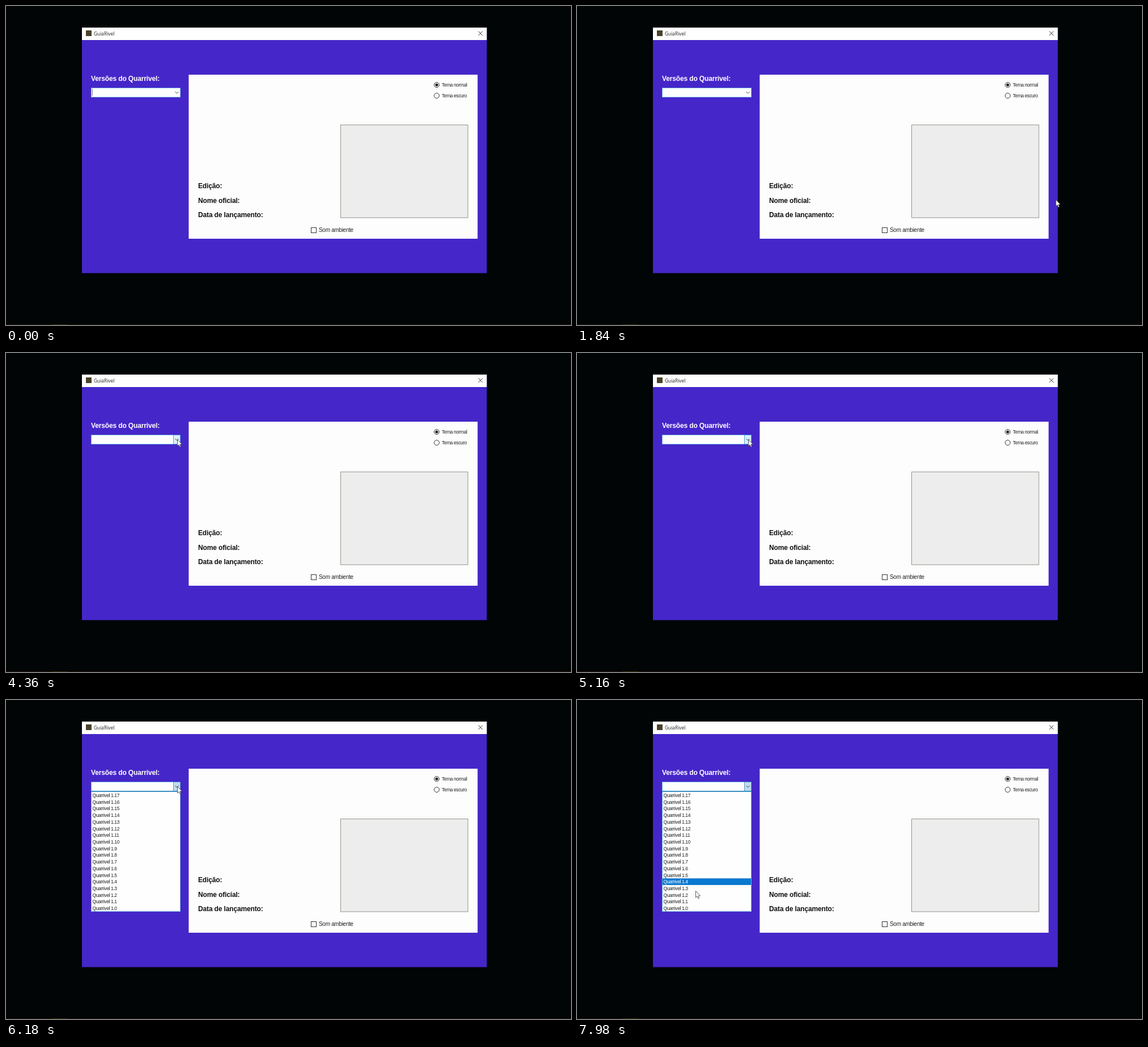
Recreate the animation shown at these times as an HTML page with a canvas. Size 997 by 562 pixels, loop 8000 ms.

```html
<!DOCTYPE html>
<html lang="pt">
<head>
<meta charset="utf-8">
<title>GuiaRivel</title>
<style>
  html, body { margin: 0; width: 100%; height: 100%; overflow: hidden; background: #010505; }
  canvas { display: block; width: 997px; height: 562px; }
</style>
</head>
<body>
<canvas id="stage"></canvas>
<script>
const W = 997, H = 562, LOOP = 8000;
const SANS = '"Liberation Sans", Arial, sans-serif';
const TITLE_FONT = '"Open Sans", "Noto Sans", sans-serif';
const LIST = { x: 150, y: 161, w: 158, h: 212, row: 11.71 };
const ITEMS = Array.from({ length: 18 }, (_, i) => `Quarrivel 1.${17 - i}`);
const ENTRY = { x: 1010, y: 392 };
const REST = { x: 308, y: 175 };
const BUTTON = { x: 302, y: 152 };
const PICK = { x: 209, y: 336 };

const canvas = document.getElementById('stage');
const ctx = canvas.getContext('2d');
const dpr = window.devicePixelRatio || 1;
canvas.width = W * dpr;
canvas.height = H * dpr;

const progress = (t, from, to) => Math.min(1, Math.max(0, (t - from) / (to - from)));
const smooth = u => u * u * (3 - 2 * u);
const easeOut = u => 1 - (1 - u) ** 2;
const mix = (a, b, u) => a + (b - a) * u;

const glide = (a, b, ux, uy = ux) => ({ x: mix(a.x, b.x, ux), y: mix(a.y, b.y, uy) });

function pointerAt(t) {
  if (t < 3340) return glide(ENTRY, REST, smooth(progress(t, 1307, 3000)));
  if (t < 7000) return glide(REST, BUTTON, smooth(progress(t, 3340, 3800)));
  const u = progress(t, 7472, 7980);
  return glide(BUTTON, PICK, u ** 1.6, u);
}

function fill(color, x, y, w, h) {
  ctx.fillStyle = color;
  ctx.fillRect(x, y, w, h);
}

function frame(color, x, y, w, h) {
  ctx.strokeStyle = color;
  ctx.lineWidth = 1;
  ctx.strokeRect(x + 0.5, y + 0.5, w - 1, h - 1);
}

function text(str, x, y, { size, color = '#222', weight = 'normal', family = SANS, tracking = 0 }) {
  ctx.font = `${weight} ${size}px ${family}`;
  ctx.letterSpacing = `${tracking * size}px`;
  ctx.fillStyle = color;
  ctx.fillText(str, x, y);
}

const small = (str, x, y, color) => text(str, x, y, { size: 8.5, color, tracking: -0.05 });
const heading = (str, x, y, color = '#111') =>
  text(str, x, y, { size: 12, color, weight: 'bold', tracking: -0.012 });

function line(color, ...points) {
  ctx.beginPath();
  points.forEach(([x, y]) => ctx.lineTo(x, y));
  ctx.strokeStyle = color;
  ctx.lineWidth = 1;
  ctx.stroke();
}

function disc(x, y, r) {
  ctx.beginPath();
  ctx.arc(x, y, r, 0, Math.PI * 2);
}

function radio(y, label, on) {
  disc(760, y, 4.5);
  ctx.strokeStyle = '#333';
  ctx.lineWidth = 1;
  ctx.stroke();
  if (on) {
    disc(760, y, 2.6);
    ctx.fillStyle = '#222';
    ctx.fill();
  }
  small(label, 769, y + 3);
}

function drawWindow() {
  fill('#010505', 0, 0, W, H);
  fill('#24120c', 0, 561, W, 1);
  fill('#3a3208', 81, 561, 28, 1);

  fill('#4526c9', 134, 38, 714.4, 432.6);
  fill('#fefefe', 134, 38, 714.4, 22);
  fill('#4b422b', 141, 43, 10, 10);
  text('GuiaRivel', 155, 52, { size: 8.4, family: TITLE_FONT });
  line('#333', [833.5, 44.5], [841, 52]);
  line('#333', [841, 44.5], [833.5, 52]);
  heading('Versões do Quarrivel:', 150, 131.5, '#fff');

  fill('#fdfdfd', 322.4, 121, 509.8, 289);
  radio(139, 'Tema normal', true);
  radio(158, 'Tema escuro', false);
  fill('#ededed', 590, 209, 225.5, 164.5);
  frame('#95958b', 590, 209, 225.5, 164.5);
  ['Edição:', 'Nome oficial:', 'Data de lançamento:']
    .forEach((label, i) => heading(label, 339, 321 + i * 25.7));
  frame('#333', 538, 390, 10, 10);
  text('Som ambiente', 552, 398.2, { size: 10, tracking: -0.03 });
}

function drawCombo(t) {
  fill('#fefefe', 150, 144, 158, 17);
  frame('#7db9e8', 150, 144, 158, 17);

  const caretOn = t < 4240 && Math.floor((t + 200) / 530) % 2 === 0;
  if (caretOn) fill('#777', 152, 146, 1, 12);

  if (t >= 3720) {
    const open = t >= 5440;
    fill(open ? '#c0dcf0' : '#dcedfb', 296, 145, 11, 15);
    frame(open ? '#5a9cc8' : '#4ba3e6', 295, 144, 13, 17);
  }
  line('#444', [298.5, 151], [301.5, 154], [304.5, 151]);
}

function drawList(t) {
  const shown = easeOut(progress(t, 5180, 5440));
  if (shown === 0) return;
  const { x, y, w, h, row } = LIST;
  const top = y - h * (1 - shown);

  ctx.save();
  ctx.beginPath();
  ctx.rect(x, y - 1, w, h + 1);
  ctx.clip();
  fill('#fefefe', x, top, w, h);
  frame('#6fb0de', x, top, w, h);

  // The highlight trails the pointer slightly
  const active = Math.floor((pointerAt(t - 45).y - y - 1) / row);
  ITEMS.forEach((item, i) => {
    const rowTop = top + 1 + i * row;
    if (i === active) fill('#0a78d0', x + 1, rowTop, w - 2, row);
    small(item, x + 2.5, rowTop + 9, i === active ? '#fff' : '#222');
  });
  ctx.restore();
  fill('#1c7fb4', x, y - 1, w, 1.3);
}

function drawPointer(t) {
  const { x, y } = pointerAt(t);
  ctx.save();
  ctx.translate(x + 0.5, y + 0.5);
  ctx.beginPath();
  [[0, 0], [0, 11.5], [2.6, 9.2], [4.4, 13.3], [6.2, 12.5], [4.5, 8.6], [8, 8.3]]
    .forEach(([a, b]) => ctx.lineTo(a, b));
  ctx.closePath();
  ctx.fillStyle = '#fff';
  ctx.fill();
  ctx.strokeStyle = '#333';
  ctx.lineWidth = 0.8;
  ctx.stroke();
  ctx.restore();
}

function render(t) {
  ctx.setTransform(dpr, 0, 0, dpr, 0, 0);
  drawWindow();
  drawCombo(t);
  drawList(t);
  drawPointer(t);
}

const start = performance.now();
function tick() {
  render((performance.now() - start) % LOOP);
  requestAnimationFrame(tick);
}
tick();
</script>
</body>
</html>
```
